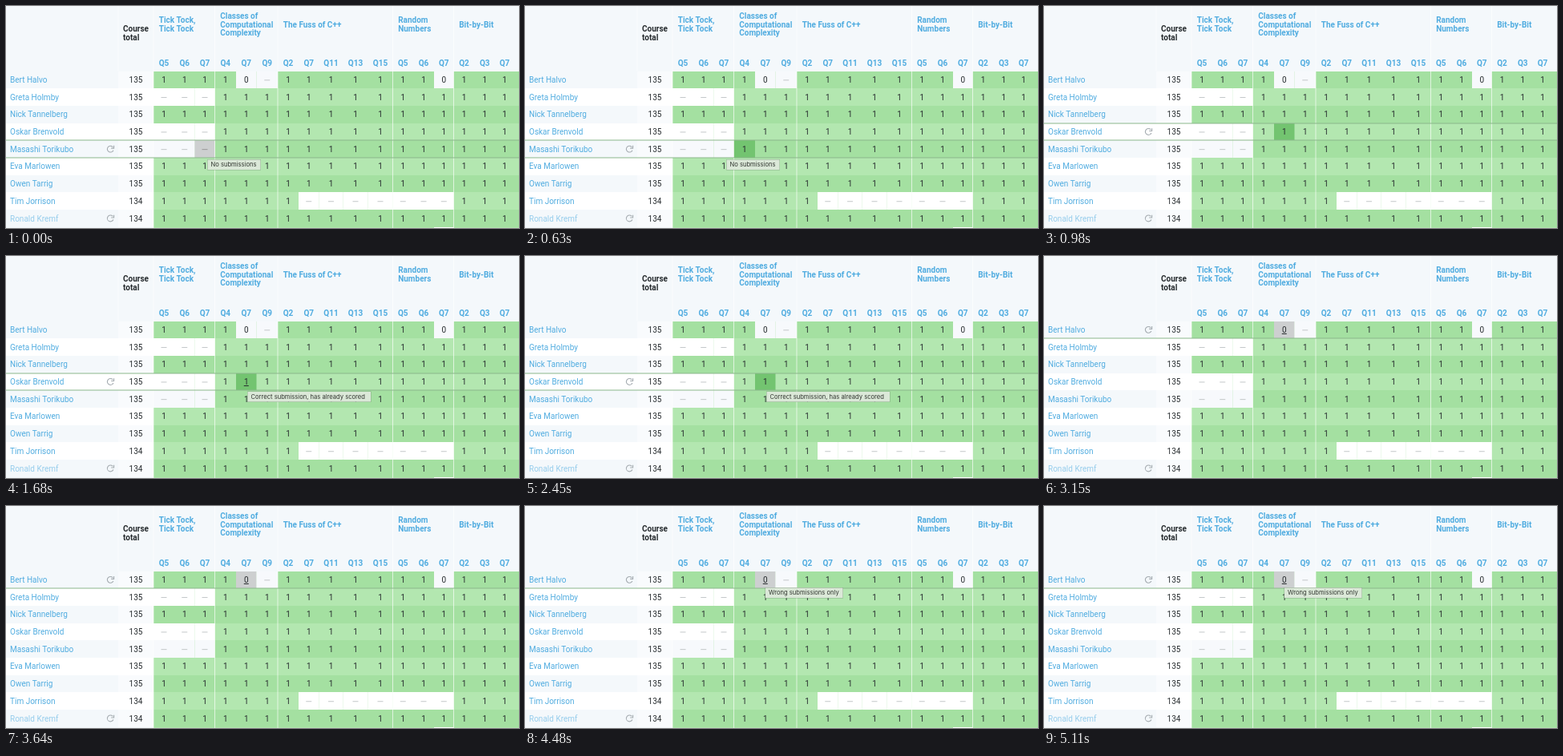
Write an HTML page with a canvas that moves like this. It is 640 px wide and 278 px high and loops after 5180 ms.

```html
<!DOCTYPE html>
<html lang="en">
<head>
<meta charset="utf-8">
<title>Course scoreboard</title>
<style>
  html, body { margin: 0; width: 100%; height: 100%; overflow: hidden; background: #f4f8fb; }
  canvas { display: block; width: 640px; height: 278px; }
</style>
</head>
<body>
<canvas id="stage"></canvas>
<script>
const LOOP = 5180, WIDTH = 640, HEIGHT = 278;
const TOP = 81.5, ROW = 21.7;
const BLUE = '#50ace0', INK = '#262b2e', SHADE = '#f4f8fb';
const edges = [184, 210, 235.5, 260.5, 287, 312.5, 339, 365, 390.5, 420.5, 451.5, 482.5, 508, 534, 558.5, 584.5, 610, 634];
const questions = 'Q5 Q6 Q7 Q4 Q7 Q9 Q2 Q7 Q11 Q13 Q15 Q5 Q6 Q7 Q2 Q3 Q7'.split(' ');
const sections = [
  [184, ['Tick Tock,', 'Tick Tock']],
  [260.5, ['Classes of', 'Computational', 'Complexity']],
  [339, ['The Fuss of C++']],
  [482.5, ['Random', 'Numbers']],
  [558.5, ['Bit-by-Bit']]
];

// Scores that differ from "1": column index to mark.
const blankStart = { 0: '–', 1: '–', 2: '–' };
const blankMiddle = Object.fromEntries([7, 8, 9, 10, 11, 12, 13].map(col => [col, '–']));
const students = [
  ['Bert Halvo', 135, { 4: '0', 5: '–', 13: '0' }],
  ['Greta Holmby', 135, blankStart],
  ['Nick Tannelberg', 135, {}],
  ['Oskar Brenvold', 135, blankStart],
  ['Masashi Torikubo', 135, blankStart],
  ['Eva Marlowen', 135, {}],
  ['Owen Tarrig', 135, {}],
  ['Tim Jorrison', 134, blankMiddle],
  ['Ronald Kremf', 134, {}]
];

const hovers = [
  { at: 0, row: 4, col: 2 },
  { at: 615, row: 4, col: 3 },
  { at: 825, row: 3, col: 3 },
  { at: 965, row: 3, col: 4 },
  { at: 1105, row: 3, col: 4, link: true },
  { at: 2375, row: 3, col: 4 },
  { at: 2515, row: 2, col: 4 },
  { at: 2655, row: 1, col: 5 },
  { at: 2795, row: 0, col: 5 },
  { at: 3075, row: 0, col: 4, link: true }
];
const tooltips = [
  { from: 0, until: 630, gone: 840, x: 251, y: 192, width: 67, text: 'No submissions' },
  { from: 1465, until: 2500, gone: 2890, x: 301, y: 169.5, width: 154.5, text: 'Correct submission, has already scored' },
  { from: 4125, until: LOOP, gone: LOOP + 1, x: 299.5, y: 102, width: 97.5, text: 'Wrong submissions only' }
];

const canvas = document.getElementById('stage');
const ctx = canvas.getContext('2d');
const scale = window.devicePixelRatio || 1;
canvas.width = WIDTH * scale;
canvas.height = HEIGHT * scale;
ctx.scale(scale, scale);

const rowTop = row => Math.round(TOP + row * ROW);
const rowMiddle = row => TOP + (row + 0.5) * ROW;

function box(x, y, width, height, color) {
  ctx.fillStyle = color;
  ctx.fillRect(x, y, width, height);
}

function text(value, x, y, color, { weight = 400, size = 10, align = 'left', family = 'Roboto' } = {}) {
  ctx.font = `${weight} ${size}px ${family}, sans-serif`;
  ctx.textAlign = align;
  ctx.fillStyle = color;
  ctx.fillText(value, x, y + size * 0.36);
}

function heading(lines, x, middle, color) {
  lines.forEach((line, i) =>
    text(line, x, middle + (i - (lines.length - 1) / 2) * 10.5, color, { weight: 700 }));
}

function refreshIcon(y) {
  ctx.strokeStyle = '#a4abb0';
  ctx.lineWidth = 1.1;
  ctx.beginPath();
  ctx.arc(130.3, y, 3.9, 0.4, Math.PI * 1.78);
  ctx.moveTo(134.6, y - 4.3);
  ctx.lineTo(134.6, y - 1);
  ctx.lineTo(131.2, y - 1);
  ctx.stroke();
}

function drawHeader() {
  box(0, 0, WIDTH, HEIGHT, SHADE);
  heading(['Course', 'total'], 146, 34, INK);
  for (const [x, lines] of sections) heading(lines, x + 6.7, 23, BLUE);
  questions.forEach((label, col) =>
    text(label, (edges[col] + edges[col + 1]) / 2, 71, BLUE, { weight: 700, align: 'center' }));
}

function drawRow(row, hover) {
  const [name, total, marks] = students[row];
  const y = rowTop(row), height = rowTop(row + 1) - y, middle = rowMiddle(row);
  const even = row % 2 === 0, hovered = hover.row === row;
  const isLast = row === students.length - 1;

  box(0, y, WIDTH, height, even ? SHADE : '#fff');
  box(140, y, 44, height, even ? '#f9fbfd' : '#fff');
  box(184, y, WIDTH - 184, height, even ? '#a4e0a1' : '#b3e7b0');
  text(name, 5, middle, isLast ? '#96cdec' : BLUE);
  text(total, 162, middle, INK, { align: 'center' });
  if (hovered || isLast) refreshIcon(middle);

  questions.forEach((_, col) => {
    const x = edges[col], width = edges[col + 1] - x, center = x + width / 2;
    const mark = marks[col] || '1', active = hovered && hover.col === col;
    if (mark !== '1') box(x, y, width, height, even ? '#f7f9fc' : '#fff');
    if (active) box(x, y, width, height, mark === '1' ? '#73c470' : '#cdcfd0');
    if (mark === '–') {
      box(center - 3.5, middle, 7, 1, active ? '#999' : '#c3c7c9');
    } else {
      text(mark, center, middle, INK, { align: 'center' });
      if (active && hover.link) box(center - 3, middle + 4.6, 6, 1, INK);
    }
  });
}

function drawTooltip({ from, until, gone, x, y, width, text: label }, time) {
  if (time < from || time >= gone) return;
  ctx.globalAlpha = Math.min(1, (gone - time) / (gone - until));
  box(x, y, width, 13.5, 'rgba(110, 130, 110, 0.55)');
  box(x + 0.5, y + 0.5, width - 1, 12.5, '#dbe8d8');
  text(label, x + 4.5, y + 6.7, '#30352f', { size: 7.6, family: 'Inter' });
  ctx.globalAlpha = 1;
}

function draw(now) {
  const time = now % LOOP;
  const hover = hovers.findLast(step => step.at <= time);

  drawHeader();
  students.forEach((_, row) => drawRow(row, hover));
  box(184, rowTop(9), WIDTH - 184, 2, '#b3e7b0');
  box(534, rowTop(9), 24.5, 2, '#fff');
  for (const [x] of sections) box(x - 0.5, 0, 1, HEIGHT, 'rgba(255, 255, 255, 0.65)');
  box(139.5, 0, 1, TOP, 'rgba(255, 255, 255, 0.65)');

  if (hover.row > 0) box(0, rowTop(hover.row) - 0.5, WIDTH, 1, '#8cb78b');
  box(0, rowTop(hover.row + 1) - 0.5, WIDTH, 1, '#8cb78b');
  tooltips.forEach(tip => drawTooltip(tip, time));
}

const start = performance.now();
function tick() {
  draw(performance.now() - start);
  requestAnimationFrame(tick);
}
tick();
</script>
</body>
</html>
```
